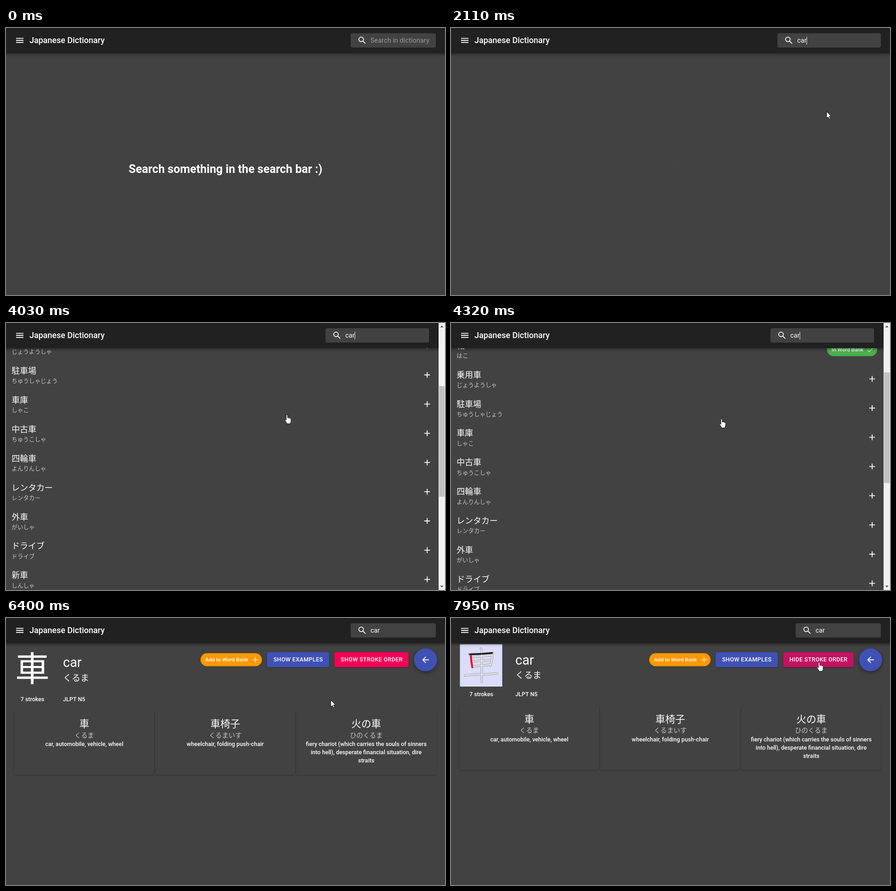
These frames come from a looping animation (959 px wide and 584 px high, 7990 ms). An HTML page:

```html
<!DOCTYPE html>
<html lang="ja">
<head>
<meta charset="utf-8">
<title>Japanese Dictionary</title>
<style>
html, body { margin: 0; width: 100%; height: 100%; overflow: hidden; background: #424242; }
svg { display: block; }
text { fill: #fff; font-family: Roboto, "Noto Sans CJK JP", "Noto Sans CJK", sans-serif; white-space: pre; }
.mid { text-anchor: middle; }
.h6 { font-size: 18px; }
.input { font-size: 14.4px; letter-spacing: .00938em; }
.body { font-size: 12.6px; font-weight: 500; }
.kana { font-size: 12.6px; }
.chip { font-size: 11.7px; font-weight: 500; }
.btn { font-size: 12.6px; font-weight: 500; letter-spacing: .02857em; }
.soft { fill: #c8c8c8; }
.bar { filter: drop-shadow(0 2px 3px rgba(0,0,0,.45)); }
.raised { filter: drop-shadow(0 1.5px 1.5px rgba(0,0,0,.35)); }
.fab { filter: drop-shadow(0 3px 4px rgba(0,0,0,.4)); }
.card { fill: #424242; filter: drop-shadow(0 1px .8px rgba(0,0,0,.3)); }

/* Every animation shares one 7990 ms loop. */
.step, .move { animation: 7990ms infinite; }
.step { animation-timing-function: step-end; }
.move { animation-timing-function: linear; }

.home { animation-name: home; }
@keyframes home { 0% { visibility: visible } 26.41%, to { visibility: hidden } }
.wait { animation-name: wait; }
@keyframes wait { 0%, 36.8%, to { visibility: hidden } 26.41% { visibility: visible } }
.list { animation-name: list; }
@keyframes list { 0%, 63.58%, to { visibility: hidden } 36.8% { visibility: visible } }
.detail { animation-name: detail; }
@keyframes detail { 0% { visibility: hidden } 63.58%, to { visibility: visible } }
.before { animation-name: before; }
@keyframes before { 0%, 88.86%, to { visibility: hidden } 63.58% { visibility: visible } }
.after { animation-name: after; }
@keyframes after { 0% { visibility: hidden } 88.86%, to { visibility: visible } }
.shift { animation-name: shift; }
@keyframes shift { 0% { transform: none } 88.86%, to { transform: translate(var(--dx), var(--dy)) } }

/* Search field */
.field { animation-name: field; }
@keyframes field {
  0%, 9.89% { transform: translateX(753px); animation-timing-function: cubic-bezier(.4,0,.2,1) }
  13.64%, 36.79% { transform: translateX(713px) }
  36.8%, 63.57% { transform: translateX(698px) }
  63.58% { transform: translateX(713px); animation-timing-function: cubic-bezier(.4,0,.2,1) }
  67.33%, to { transform: translateX(753px) }
}
.box { animation-name: box; }
@keyframes box {
  0%, 9.89% { width: 186px; animation-timing-function: cubic-bezier(.4,0,.2,1) }
  13.64% { width: 226px }
  63.58% { width: 226px; animation-timing-function: cubic-bezier(.4,0,.2,1) }
  67.33%, to { width: 186px }
}
.hint { animation-name: hint; }
@keyframes hint { 0% { visibility: visible } 20.28%, to { visibility: hidden } }
.caret { animation-name: caret; }
@keyframes caret {
  0% { visibility: hidden; transform: none }
  10.01% { visibility: visible; transform: none }
  15.64% { visibility: hidden; transform: none }
  20.28% { visibility: visible; transform: translateX(7.7px) }
  22.03% { visibility: visible; transform: translateX(15.6px) }
  23.9% { visibility: visible; transform: translateX(20.6px) }
  31.41% { visibility: hidden; transform: translateX(20.6px) }
  36.8% { visibility: visible; transform: translateX(20.6px) }
  63.58%, to { visibility: hidden; transform: translateX(20.6px) }
}
.k1 { animation-name: k1; }
@keyframes k1 { 0%, 22.03%, to { visibility: hidden } 20.28% { visibility: visible } }
.k2 { animation-name: k2; }
@keyframes k2 { 0%, 23.9%, to { visibility: hidden } 22.03% { visibility: visible } }
.k3 { animation-name: k3; }
@keyframes k3 { 0% { visibility: hidden } 23.9%, to { visibility: visible } }

/* Spinner */
.spin { animation-name: spin; }
@keyframes spin { 0%, 26.41% { transform: rotate(0) } 36.8%, to { transform: rotate(213deg) } }
.arc { animation-name: arc; }
@keyframes arc {
  0%, 26.41% { stroke-dasharray: 1 200; stroke-dashoffset: 0; animation-timing-function: ease-in-out }
  35.17% { stroke-dasharray: 100 200; stroke-dashoffset: -15; animation-timing-function: ease-in }
  36.8%, to { stroke-dasharray: 100 200; stroke-dashoffset: -22 }
}

/* List */
.scroll { animation-name: scroll; }
@keyframes scroll {
  0%, 45.06% { transform: none; animation-timing-function: ease-in-out }
  50.06%, 53.32% { transform: translateY(var(--end)) }
  54%, 54.5% { transform: translateY(calc(var(--end) * .7583)); animation-timing-function: ease-out }
  58.82%, to { transform: none }
}
.up { animation-name: up; }
@keyframes up { 0%, 58.5%, to { fill: #a3a3a3 } 45.2% { fill: #505050 } }
.hover1 { animation-name: hover1; }
@keyframes hover1 {
  0%, 37.05% { opacity: 0 } 38.92%, 42.55% { opacity: .08 } 43.8% { opacity: .006 }
  44.18% { opacity: .022 } 45.3% { opacity: .07 } 47.06%, 58.82% { opacity: 0 } 60.7%, to { opacity: .08 }
}
.hover2 { animation-name: hover2; }
@keyframes hover2 {
  0%, 42.55% { opacity: 0 } 43.8% { opacity: .07 } 44.18% { opacity: .058 } 45.68%, to { opacity: 0 }
}

/* Stroke order */
.press { animation-name: press; }
@keyframes press { 0%, 83.8% { fill: #f50057 } 86.9%, to { fill: #c51162 } }
.draw1 { animation-name: draw1; }
@keyframes draw1 {
  0%, 90.11% { stroke-dashoffset: 1.1; stroke: #e8112d }
  95.12%, 95.37% { stroke-dashoffset: 0; stroke: #e8112d }
  95.38%, to { stroke-dashoffset: 0; stroke: #080808 }
}
.draw2 { animation-name: draw2; }
@keyframes draw2 { 0%, 96.37% { stroke-dashoffset: 1.2 } 99.5%, to { stroke-dashoffset: 0 } }

/* Pointer */
.pointer { animation-name: pointer; }
@keyframes pointer {
  0%, 3.13% { transform: translate(872px, 590px); animation-timing-function: ease-in-out }
  8.5%, 10.01% { transform: translate(848px, 28px); animation-timing-function: ease-in-out }
  12.77%, 42.55% { transform: translate(820px, 182px) }
  43.3% { transform: translate(735px, 200px) }
  44.18% { transform: translate(660px, 182px) }
  46.31% { transform: translate(640px, 190px) }
  54%, 54.5% { transform: translate(591px, 210px) }
  61.95%, 63.58% { transform: translate(446px, 154px); animation-timing-function: ease-out }
  67.33%, 78.1% { transform: translate(445px, 200px) }
  80.05%, 80.55% { transform: translate(709px, 179px); animation-timing-function: ease-out }
  84.48%, to { transform: translate(804px, 97px) }
}
.arrow { animation-name: arrow; }
@keyframes arrow { 0%, 63.58% { visibility: visible } 38%, 83.2%, to { visibility: hidden } }
.hand { animation-name: hand; }
@keyframes hand { 0%, 63.58% { visibility: hidden } 38%, 83.2%, to { visibility: visible } }
</style>
</head>
<body>
<svg width="959" height="584" viewBox="0 0 959 584">
  <defs>
    <path id="plus" d="M-6.3 0H6.3M0-6.3V6.3" fill="none" stroke="#fff" stroke-width="1.8"/>
    <g id="glyph" fill="none" stroke-linecap="round" stroke-linejoin="round">
      <path d="M40 79Q66 79 91 76M43 82Q44 96 47 108M45 85Q70 84 90 81Q90 92 86 104M47 95L86 92M48 106L86 102M31 126Q40 124 62 123.500T101 121.500M65 67Q68 68 67 76V140"/>
    </g>
  </defs>
  <rect width="959" height="584" fill="#424242"/>

  <text class="mid home step" x="479.500" y="317" font-size="25.200" font-weight="700">Search something in the search bar :)</text>

  <g class="wait step" transform="translate(479.500 290) scale(.77)">
    <g class="spin move"><circle class="arc move" r="20.200" fill="none" stroke="#3f51b5" stroke-width="3.600"/></g>
  </g>

  <g class="list step">
    <g class="scroll move" id="rows" style="--end:-300px">
      <rect class="hover1 move" y="125.900" width="945" height="63.900" fill="#fff"/>
      <rect class="hover2 move" y="189.800" width="945" height="63.900" fill="#fff"/>
    </g>
  </g>

  <g class="detail step">
    <g class="shift step" style="--dx:16px;--dy:-5.4px">
      <text x="124.600" y="107.300" font-size="28.800">car</text>
      <text x="124.600" y="137.500" font-size="19.200">くるま</text>
    </g>
    <text class="body mid shift step" style="--dx:8.500px;--dy:-10.600px" x="57.800" y="182">7 strokes</text>
    <text class="body shift step" style="--dx:16px;--dy:-10.600px" x="124.600" y="182">JLPT N5</text>
    <g class="shift step" id="cards" style="--dx:0px;--dy:-10.600px"></g>
    <g class="shift step" style="--dx:8px;--dy:0px">
      <rect x="425" y="77" width="134" height="28.500" rx="14.250" fill="#ff9800"/>
      <text class="chip" x="435.300" y="95.200">Add to Word Bank</text>
      <use href="#plus" x="544.800" y="91.400" opacity=".7"/>
      <rect class="raised" x="570" y="75" width="136" height="32.500" rx="3.600" fill="#3f51b5"/>
      <text class="btn mid" x="638.300" y="95.300">SHOW EXAMPLES</text>
    </g>
    <circle class="fab" cx="916.500" cy="91.500" r="25" fill="#3f51b5"/>
    <path transform="translate(905.700 80.700) scale(.9)" fill="#fff" d="M20 11H7.830l5.590-5.590L12 4l-8 8 8 8 1.410-1.410L7.830 13H20z"/>
  </g>
  <g class="before step">
    <text class="mid" x="57.500" y="137.900" font-size="75" font-weight="300">車</text>
    <rect class="press move raised" x="717.500" y="75" width="162" height="32.500" rx="3.600"/>
    <text class="btn mid" x="798.800" y="95.300">SHOW STROKE ORDER</text>
  </g>
  <g class="after step">
    <rect x="19.500" y="57.500" width="92.500" height="92.500" fill="#dcdcfb"/>
    <use href="#glyph" stroke="#999" stroke-width="4.600"/>
    <use href="#glyph" stroke="#e9e9f4" stroke-width="2.600"/>
    <g fill="none" stroke-width="4" stroke-linecap="round" stroke-dasharray="1 3">
      <path class="draw1 move" pathLength="1" stroke-width="3.200" d="M41 79.500Q66 79 90 76.500"/>
      <path class="draw2 move" pathLength="1" stroke="#e8112d" d="M43.500 82.500Q44 96 46.500 107.500"/>
    </g>
    <rect class="raised" x="725.500" y="75" width="154" height="32.500" rx="3.600" fill="#c51162"/>
    <text class="btn mid" x="802.700" y="95.300">HIDE STROKE ORDER</text>
  </g>

  <rect class="bar" x="-10" y="-10" width="979" height="65" fill="#212121"/>
  <path d="M22 22.600H38.200M22 27H38.200M22 31.500H38.200" stroke="#fff" stroke-width="1.800"/>
  <text class="h6" x="51.200" y="33.200" font-weight="500">Japanese Dictionary</text>
  <g class="field move">
    <rect class="box move" y="11.500" width="186" height="31.300" rx="3.600" fill="#424242"/>
    <g fill="none" stroke="#fff" stroke-width="1.800">
      <circle cx="22.900" cy="24.800" r="5"/>
      <path d="M26.700 28.600L32.200 34.100"/>
    </g>
    <text class="input hint step" x="43.200" y="32" style="fill:#9c9c9c">Search in dictionary</text>
    <g class="input">
      <text class="k1 step" x="43.200" y="32">c</text>
      <text class="k2 step" x="43.200" y="32">ca</text>
      <text class="k3 step" x="43.200" y="32">car</text>
    </g>
    <rect class="caret step" x="43" y="19" width="1" height="17" fill="#fff"/>
  </g>

  <g class="list step">
    <rect x="945" width="14" height="584" fill="#f1f1f1"/>
    <rect class="scroll move" style="--end:-124px" x="946" y="14" width="12" height="242" fill="#c1c1c1" id="thumb"/>
    <path class="up step" d="M948.500 9.500L952 5.500 955.500 9.500z"/>
    <path d="M948.500 574.500L952 578.500 955.500 574.500z" fill="#505050"/>
  </g>

  <g class="pointer move" fill="#fff" stroke="#111" stroke-linejoin="round">
    <path class="arrow step" d="M.500.500V15.500L4 12.200 6.300 17.300 8.600 16.300 6.300 11.300H10.800Z"/>
    <path class="hand step" d="M-1.500 1.200a1.500 1.500 0 0 1 3 0V6.800c.6-.8 2.600-.7 2.900.4c.7-.6 2.400-.4 2.600.6c.8-.3 2 .1 2 1.300V14c0 2-1.400 3-1.600 5.500H.3C0 17.600-2 15.600-4.200 12c-.7-1.300.9-2.400 1.900-1.200l.8 1Z"/>
  </g>
</svg>
<script>
const words = [
  ['自動車', 'じどうしゃ', true], ['車', 'くるま'], ['カー', 'カー'], ['箱', 'はこ', true],
  ['乗用車', 'じょうようしゃ'], ['駐車場', 'ちゅうしゃじょう'], ['車庫', 'しゃこ'],
  ['中古車', 'ちゅうこしゃ'], ['四輪車', 'よんりんしゃ'], ['レンタカー', 'レンタカー'],
  ['外車', 'がいしゃ'], ['ドライブ', 'ドライブ'], ['新車', 'しんしゃ'], ['貨車', 'かしゃ']
];
const cards = [
  ['車', 'くるま', 'car, automobile, vehicle, wheel'],
  ['車椅子', 'くるまいす', 'wheelchair, folding push-chair'],
  ['火の車', 'ひのくるま', 'fiery chariot (which carries the souls of sinners',
    'into hell), desperate financial situation, dire', 'straits']
];
const add = (id, html) => document.getElementById(id).insertAdjacentHTML('beforeend', html);

// The thumb travels down while the rows travel up.
document.getElementById('thumb').style.setProperty('--end', '124px');

const banked = `<rect x="821.500" y="17.800" width="109.500" height="28.500" rx="14.250" fill="#4caf50"/>
  <text class="chip" x="831.600" y="35.800">In Word Bank</text>
  <path transform="translate(906 22.300) scale(.825)" fill="#fff" opacity=".7"
    d="M9 16.200L4.800 12l-1.400 1.400L9 19 21 7l-1.400-1.400z"/>`;

words.forEach(([word, kana, saved], i) => add('rows', `<g transform="translate(0 ${62 + 63.9 * i})">
  <text class="h6" x="12.300" y="29.500">${word}</text>
  <text class="kana soft" x="12.300" y="49.800">${kana}</text>
  ${saved ? banked : '<use href="#plus" x="920" y="32"/>'}</g>`));

cards.forEach(([word, kana, ...lines], i) => {
  const mid = 171 + 308 * i;
  add('cards', `<rect class="card" x="${mid - 153.6}" y="202" width="306.500" height="141" rx="3.600"/>
    <text class="mid" x="${mid}" y="239.200" font-size="21.600">${word}</text>
    <text class="mid soft" x="${mid}" y="262" font-size="14.400">${kana}</text>` +
    lines.map((line, n) => `<text class="body mid" x="${mid}" y="${280.2 + 18 * n}">${line}</text>`).join(''));
});
</script>
</body>
</html>
```
